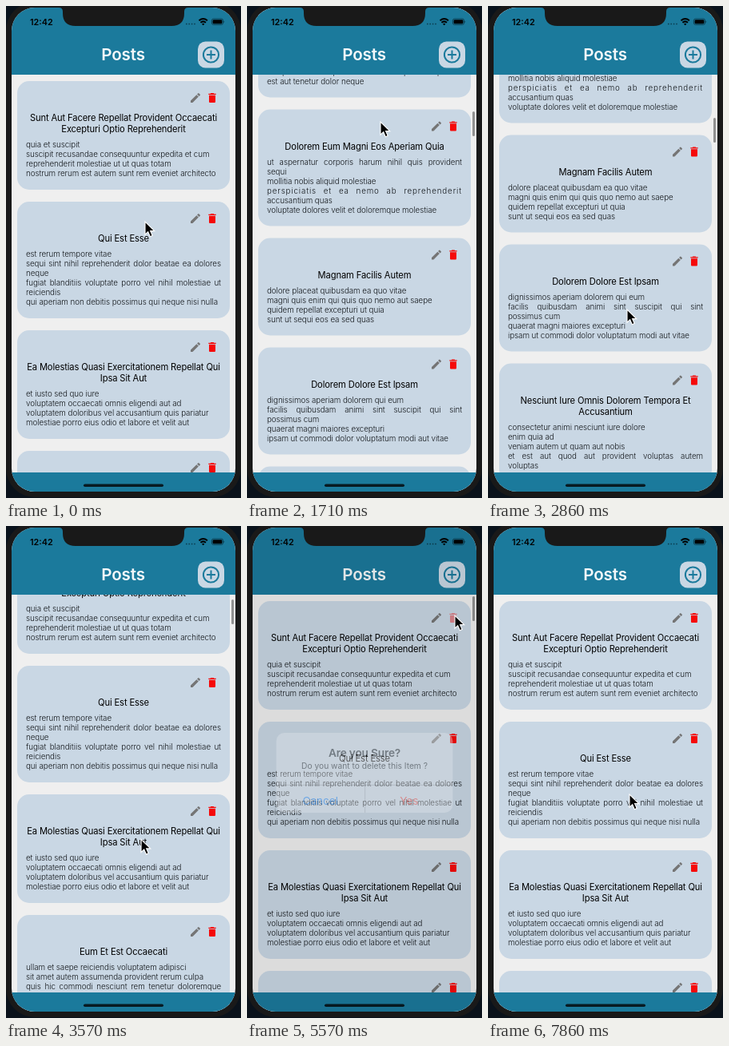
These frames come from a looping animation (294 px wide and 616 px high, 8 s). An HTML page:

```html
<!DOCTYPE html>
<html lang="en">
<head>
<meta charset="utf-8">
<title>Posts</title>
<style>
html, body { margin: 0; width: 100%; height: 100%; overflow: hidden; background: #0a121b; }
body { position: relative; font-family: Inter, Roboto, sans-serif; color: #0b0d0f; }
div, svg { position: absolute; }
.phone { left: 0; top: -5px; width: 294px; height: 620px; border-radius: 36px; background: #191919; }
.screen { left: 7px; top: 2px; width: 280px; height: 606px; border-radius: 29px; overflow: hidden; background: #efefef; }
.page { left: -7px; top: -2px; width: 294px; height: 616px; }
.bar { left: 0; width: 294px; background: #1b7a9c; }
.heading { left: 0; width: 293px; top: 47px; font: 600 20.6px/28px Inter, sans-serif; letter-spacing: -.15px; text-align: center; color: #f4f8fa; }
.card { left: 14px; width: 266px; border-radius: 15px; background: #c9d7e4; }
.title { left: 0; width: 266px; top: 39px; text-align: center; font: 400 11.2px/14px Inter, sans-serif; letter-spacing: -.13px; color: #000; }
.text { left: 11px; width: 244px; font: 300 9.8px/12px Inter, sans-serif; letter-spacing: -.06px; color: #15191d; white-space: nowrap; }
.text p { margin: 0; }
.text .wide { text-align-last: justify; }
.text .loose { letter-spacing: .85px; }
.thumb { left: 282px; width: 3px; height: 31px; border-radius: 2px; background: #00000066; }
.dim { inset: 0; background: #000; }
.alert { left: 50px; top: 265px; width: 194px; height: 88px; border-radius: 9px; background: #e0e5eb; text-align: center; }
.alert div { left: 0; width: 194px; white-space: nowrap; }
.alert .choice { top: 56.5px; width: 97px; height: 31.5px; font-size: 11.9px; line-height: 34px; border-top: .5px solid #0003; box-sizing: border-box; }
</style>
</head>
<body>
<div class="phone"></div>
<div class="screen"><div class="page">
  <div id="list"></div>
  <div class="thumb" id="thumb"></div>
  <div class="bar" style="top:0;height:85.5px"></div>
  <div class="bar" style="top:583.5px;height:33px"></div>
  <div class="heading">Posts</div>
  <svg width="294" height="616" viewBox="0 0 294 616">
    <rect x="240" y="44.5" width="33" height="33" rx="9.5" fill="#c9d7e4"/>
    <g fill="none" stroke="#1b7a9c" stroke-width="2">
      <circle cx="256.5" cy="61" r="9.6"/><path d="M251 61h11M256.5 55.5v11"/>
    </g>
    <text x="30" y="24" font-size="10.8" font-weight="600">12:42</text>
    <path d="M225 22.5h12" stroke="#0b3d50" stroke-width="1.6" stroke-dasharray="1.6 1.8"/>
    <g fill="none" stroke="#000" stroke-width="2">
      <path d="M241.5 18.2q5.2-4.4 10.4 0M243.4 20.7q3.3-2.6 6.6 0"/>
    </g>
    <path d="M245 22.4q1.7-1.2 3.4 0l-1.7 1.8z"/>
    <rect x="257.4" y="16" width="14.2" height="7.4" rx="2.2" fill="none" stroke="#0a3444" stroke-width=".8"/>
    <rect x="258.6" y="17.2" width="11.8" height="5" rx="1.2"/>
    <path d="M272.6 18.4q1.2 1.3 0 2.6z"/>
    <rect x="97" y="598.5" width="100" height="3.6" rx="1.8" fill="#071a22"/>
  </svg>
  <div class="dim" id="dim"></div>
  <div class="alert" id="alert">
    <div style="top:13.5px;font:600 12px/16px Inter,sans-serif;letter-spacing:-.15px">Are you Sure?</div>
    <div style="top:31px;font-size:9px;line-height:12px">Do you want to delete this Item ?</div>
    <div class="choice" style="color:#007aff">Cancel</div>
    <div class="choice" style="left:97px;color:#ff3b30;border-left:.5px solid #0003">Yes</div>
  </div>
</div></div>
<svg width="294" height="616" viewBox="0 0 294 616">
  <path d="M66 0v2q5 0 5 5v2q0 16 16 16h120q16 0 16-16V7q0-5 5-5V0z" fill="#191919"/>
  <path id="cursor" d="M0 0v16.2l3.7-3.5 2.6 6 2.9-1.2-2.6-5.9h5.1z" stroke="#fff" stroke-width="1.1"/>
</svg>
<script>
// Title lines are split by "/". A body line ending in "+" is justified, in "~" also letter-spaced.
const posts = [
  ["Sunt Aut Facere Repellat Provident Occaecati/Excepturi Optio Reprehenderit",
   "quia et suscipit/suscipit recusandae consequuntur expedita et cum/reprehenderit molestiae ut ut quas totam/nostrum rerum est autem sunt rem eveniet architecto"],
  ["Qui Est Esse",
   "est rerum tempore vitae/sequi sint nihil reprehenderit dolor beatae ea dolores+/neque/fugiat blanditiis voluptate porro vel nihil molestiae ut+/reiciendis/qui aperiam non debitis possimus qui neque nisi nulla"],
  ["Ea Molestias Quasi Exercitationem Repellat Qui/Ipsa Sit Aut",
   "et iusto sed quo iure/voluptatem occaecati omnis eligendi aut ad/voluptatem doloribus vel accusantium quis pariatur/molestiae porro eius odio et labore et velit aut"],
  ["Eum Et Est Occaecati",
   "ullam et saepe reiciendis voluptatem adipisci/sit amet autem assumenda provident rerum culpa/quis hic commodi nesciunt rem tenetur doloremque+/ipsam iure/quis sunt voluptatem rerum illo velit"],
  ["Nesciunt Quas Odio",
   "repudiandae veniam quaerat sunt sed/alias aut fugiat sit autem sed est/voluptatem omnis possimus esse voluptatibus quis/est aut tenetur dolor neque"],
  ["Dolorem Eum Magni Eos Aperiam Quia",
   "ut aspernatur corporis harum nihil quis provident+/sequi/mollitia nobis aliquid molestiae/perspiciatis et ea nemo ab reprehenderit~/accusantium quas/voluptate dolores velit et doloremque molestiae"],
  ["Magnam Facilis Autem",
   "dolore placeat quibusdam ea quo vitae/magni quis enim qui quis quo nemo aut saepe/quidem repellat excepturi ut quia/sunt ut sequi eos ea sed quas"],
  ["Dolorem Dolore Est Ipsam",
   "dignissimos aperiam dolorem qui eum/facilis quibusdam animi sint suscipit qui sint+/possimus cum/quaerat magni maiores excepturi/ipsam ut commodi dolor voluptatum modi aut vitae"],
  ["Nesciunt Iure Omnis Dolorem Tempora Et/Accusantium",
   "consectetur animi nesciunt iure dolore/enim quia ad/veniam autem ut quam aut nobis/et est aut quod aut provident voluptas autem+/voluptas"],
  ["Optio Molestias Id Quia Eum",
   "quo et expedita modi cum officia vel magni/doloribus qui repudiandae/vero nisi sit/quos veniam quod sed accusamus veritatis error"]
];
const icon = (x, color, d) =>
  `<svg style="left:${x}px;top:13.5px" width="16" height="16" viewBox="0 0 24 24"><path fill="${color}" d="${d}"/></svg>`;
const icons =
  icon(215, "#757575", "M3 17.2V21h3.8L17.8 9.9l-3.7-3.7zM20.7 7a1 1 0 000-1.4l-2.3-2.3a1 1 0 00-1.4 0l-1.9 1.8 3.8 3.8z") +
  icon(236, "#f50a0a", "M6 19c0 1.1.9 2 2 2h8c1.1 0 2-.9 2-2V7H6zM19 4h-3.5l-1-1h-5l-1 1H5v2h14z");
const row = line => {
  const kind = { "+": "wide", "~": "wide loose" }[line.at(-1)] || "";
  return `<p class="${kind}">${line.replace(/[+~]$/, "")}</p>`;
};

const $ = id => document.getElementById(id);
let y = 93.5, html = "";
for (const [title, body] of posts) {
  const heads = title.split("/"), lines = body.split("/");
  const height = 60.5 + 14 * heads.length + 12 * lines.length;
  html += `<div class="card" style="top:${y}px;height:${height}px">${icons}
    <div class="title">${heads.join("<br>")}</div>
    <div class="text" style="top:${46.5 + 14 * heads.length}px">${lines.map(row).join("")}</div></div>`;
  y += height + 14.5;
}
$("list").innerHTML = html;
const trash = document.querySelectorAll(".card svg")[1];

// Keys are [tick, value...]; there are seven ticks per second.
const scrollKeys = [[1, 0], [3, 150], [5, 290], [8, 350], [9, 400], [12, 713.5], [13, 840], [14, 940], [15, 1000],
  [17, 1000], [20, 842.5], [21.5, 540], [23, 280], [25, 70], [27, 0]];
const cursorKeys = [[0, 174, 270], [1, 174, 300], [3, 172, 180], [8, 170, 380], [12, 167, 145], [15, 170, 222],
  [17, 170, 222], [20, 174, 380], [23, 174, 450], [30, 149, 159], [37, 259, 111], [39, 260, 112], [41, 258, 116],
  [46, 176, 335], [52, 176, 335], [53, 177, 336]];
const alertKeys = [[38, 0], [39, .4], [40, .85], [41, 1], [47, 1], [48, .6], [49, .25], [50, .07], [51, 0]];
const thumbKeys = [[1, 0], [2, 1], [39, 1], [42, 0]];
const trashKeys = [[37, 1], [38, .2], [39, .4], [40, 1]];

const linear = u => u, smooth = u => u * u * (3 - 2 * u);
function at(keys, n, ease = linear) {
  const i = keys.findIndex(k => k[0] > n);
  if (i < 1) return (i ? keys.at(-1) : keys[0]).slice(1);
  const a = keys[i - 1], b = keys[i], u = ease((n - a[0]) / (b[0] - a[0]));
  return a.slice(1).map((v, j) => v + (b[j + 1] - v) * u);
}

function draw(ms) {
  const n = Math.floor((ms % 8000 + 5) * 7 / 1000) % 56;
  const [scroll] = at(scrollKeys, n), [shown] = at(alertKeys, n);
  $("list").style.transform = `translateY(${-scroll}px)`;
  $("thumb").style.top = 88 + scroll * .0622 + "px";
  $("thumb").style.opacity = at(thumbKeys, n)[0];
  trash.style.opacity = at(trashKeys, n)[0];
  $("dim").style.opacity = shown * .2;
  $("alert").style.opacity = shown;
  $("alert").style.transform = `scale(${n < 44 ? 1.23 - .23 * shown : 1})`;
  $("cursor").setAttribute("transform", `translate(${at(cursorKeys, n, smooth)})`);
}

const start = performance.now();
function loop() {
  draw(performance.now() - start);
  requestAnimationFrame(loop);
}
loop();
</script>
</body>
</html>
```
